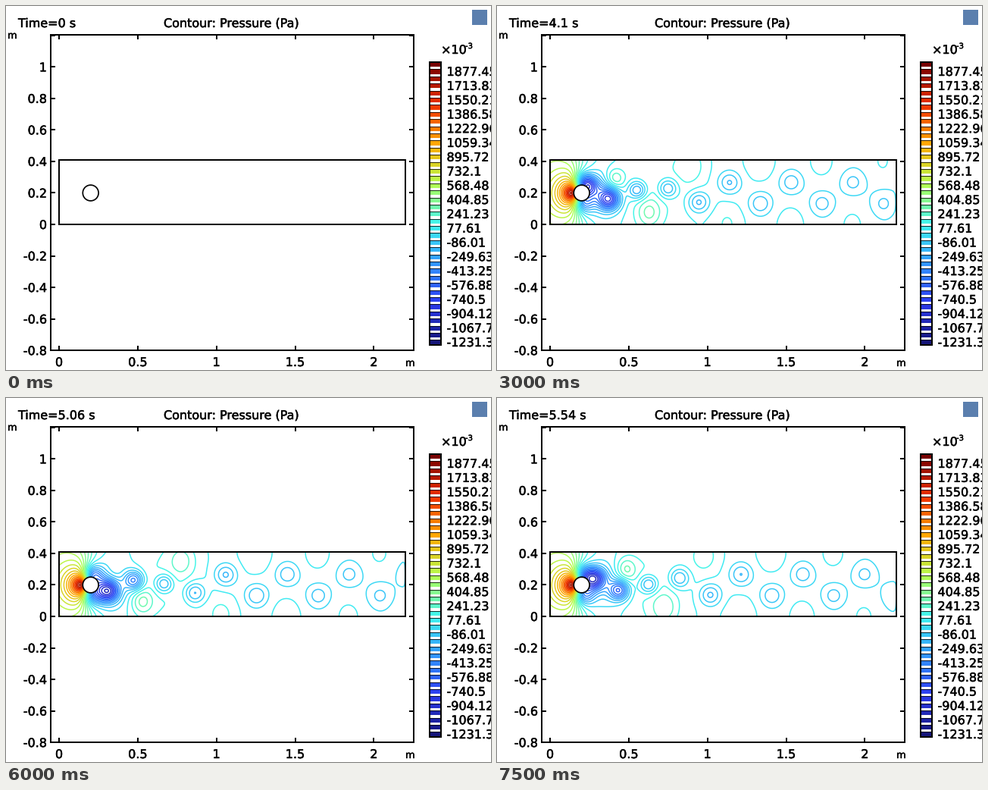
A matplotlib script that plays this animation: 640 px wide and 480 px high, repeating every 8 s.

```python
import numpy as np
import matplotlib.pyplot as plt
from matplotlib.animation import FuncAnimation
from matplotlib.colors import LinearSegmentedColormap
from matplotlib.patches import Circle, Rectangle
from matplotlib.patheffects import withStroke

W, H, DPI = 640, 480, 80
PT = 72 / DPI                       # points per pixel
FRAMES, INTERVAL = 16, 500

X0, Y0, SCALE = 70, 288, 207.7      # data origin and pixels per metre
LEFT, RIGHT, TOP, BOTTOM = 59, 538, 38, 454
OUT, ROOF, MID = 527, 203, 246.5    # channel outlet, upper wall, centre line
CX, R = 111.7, 10.4                 # cylinder

LABEL_TOP, LABEL_STEP = 1877.4503, 163.6218
STEP = LABEL_STEP / 2
LEVELS = LABEL_TOP + STEP - STEP * np.arange(39, -1, -1)

plt.rcParams["font.family"] = "DejaVu Sans"
fig = plt.figure(figsize=(W / DPI, H / DPI), dpi=DPI, facecolor="white")
ax = fig.add_axes([0, 0, 1, 1])
ax.set_xlim(0, W)
ax.set_ylim(H, 0)
ax.axis("off")
cmap = LinearSegmentedColormap.from_list("rainbow", [
    "#141478", "#2d3cf0", "#3296ff", "#41f5f0",
    "#b4ff50", "#ffaa00", "#f03200", "#780000"])
norm = plt.Normalize(LEVELS[0], LEVELS[-1])
bold = [withStroke(linewidth=0.5 * PT, foreground="black")]


def text(x, y, s, size=16, ha="left"):
    return ax.text(x, y, s, fontsize=size * PT, ha=ha, va="baseline",
                   zorder=6, path_effects=bold)


def line(xs, ys, width=2):
    ax.plot(xs, ys, color="black", lw=width * PT, zorder=5,
            solid_capstyle="butt")


def box(x, y, w, h, **style):
    ax.add_patch(Rectangle((x, y), w, h, **style))


def draw_axes():
    frame = dict(fill=False, ec="black", lw=2 * PT, zorder=5)
    box(LEFT, TOP, RIGHT - LEFT, BOTTOM - TOP, **frame)
    box(X0, ROOF, OUT - X0, Y0 - ROOF, **frame)
    ax.add_patch(Circle((CX, MID), R, fc="white", ec="black", lw=1.7 * PT,
                        zorder=4))
    for v in np.arange(-4, 7) / 5:
        y = Y0 - v * SCALE
        line([LEFT, LEFT + 6], [y, y])
        line([RIGHT - 6, RIGHT], [y, y])
        if v < 1.1:
            text(54, y + 6, f"{v:g}", ha="right")
    for v in np.arange(5) / 2:
        x = X0 + v * SCALE
        line([x, x], [BOTTOM - 6, BOTTOM])
        line([x, x], [TOP, TOP + 6])
        text(x, 475, f"{v:g}", ha="center")
    text(2, 43, "m", 13)
    text(527, 475, "m", 13)
    text(208, 28, "Contour: Pressure (Pa)")


def draw_legend():
    text(574, 63, "×10")
    text(606, 56, "-3", 10)
    pitch = 18.79
    for k, level in enumerate(LEVELS[::-1]):
        y = 77 + k * pitch / 2
        box(559, y - 3, 15, 6.2, fc=cmap(norm(level)), ec="none", zorder=3)
        line([559, 574], [y - 3, y - 3], 0.8)
    box(559, 74, 15, 373, fill=False, ec="black", lw=2 * PT, zorder=5)
    for j in range(20):
        value = round(LABEL_TOP - j * LABEL_STEP, 2)
        text(581.5, 92 + j * pitch, f"{value:g}")
    box(615, 5, 20, 20, fc="#5b7fae", ec="none")


gx, gy = np.meshgrid(np.linspace(X0, OUT, 381), np.linspace(ROOF, Y0, 86))


def gauss(x, y, sx, sy):
    return np.exp(-((gx - x) / sx) ** 2 / 2 - ((gy - y) / sy) ** 2 / 2)


def rise(x, centre, width):
    """Smooth step from 0 to 1."""
    return 1 / (1 + np.exp((centre - x) / width))


def steady_field():
    p = 75 * (OUT - gx) / 327 + 380 * rise(-gx, -112, 13)
    d2 = (gx - 101) ** 2 + (gy - MID) ** 2
    front = 1700 / (1 + d2 / 100) + 350 * np.exp(-d2 / 1150)
    p += front * rise(-gx, -107, 5)
    for side in (-1, 1):
        p -= 500 * gauss(114, MID + side * 12, 9, 10)
    p -= 200 * gauss(128, MID, 17, 17) + 150 * gauss(135, MID, 25, 40)
    return p + 100 * gauss(205, MID, 35, 50)


STEADY = steady_field()
SPACING, DRIFT = 40.7, 37.87        # vortex spacing, advance per frame


def vortex(far, side):
    """Low-pressure core and the high it leaves by the opposite wall."""
    x = 111 + 20 * np.log1p(np.exp((far - 111) / 20))
    swell = np.exp(-((x - 140) / 20) ** 2 / 2)
    settle = rise(x, 235, 25)

    amp = (330 * np.exp((200 - x) / 300) + 420 * swell) * rise(far, 98, 6)
    size = 7.8 + 2.2 * swell + 2.2 * settle
    off = 9 - 23 * rise(x, 212, 22)
    p = -amp * gauss(x, MID + side * off, size, size)

    hx = x - 30 * np.exp(-((x - 195) / 50) ** 2 / 2)
    hy = 15 + 27 * settle
    high = (80 + 210 * np.exp((186 - x) / 70)) * rise(x, 172, 4)
    return p + high * gauss(hx, MID + side * hy, 8 + 7 * settle,
                            9 + 10 * settle)


def pressure(i):
    p = STEADY.copy()
    shift = 231 + (i - 4) * DRIFT
    first = int(np.ceil((72 - shift) / SPACING))
    last = int((575 - shift) // SPACING)
    for n in range(first, last + 1):
        p += vortex(shift + n * SPACING, 1 if n % 2 == 0 else -1)
    return p * np.tanh((OUT - gx) / 6)


draw_axes()
draw_legend()
clock = text(16, 28, "")
shown = []


def update(i):
    while shown:
        shown.pop().remove()
    seconds = 3.14 + 0.16 * i if i else 0
    clock.set_text(f"Time={round(seconds, 2):g} s")
    if i:
        shown.append(ax.contour(gx, gy, pressure(i), levels=LEVELS, cmap=cmap,
                                norm=norm, linewidths=1.5 * PT,
                                linestyles="solid", zorder=2))
    return []


anim = FuncAnimation(fig, update, frames=FRAMES, init_func=lambda: [],
                     interval=INTERVAL, repeat=True, repeat_delay=0)
plt.show()
```
